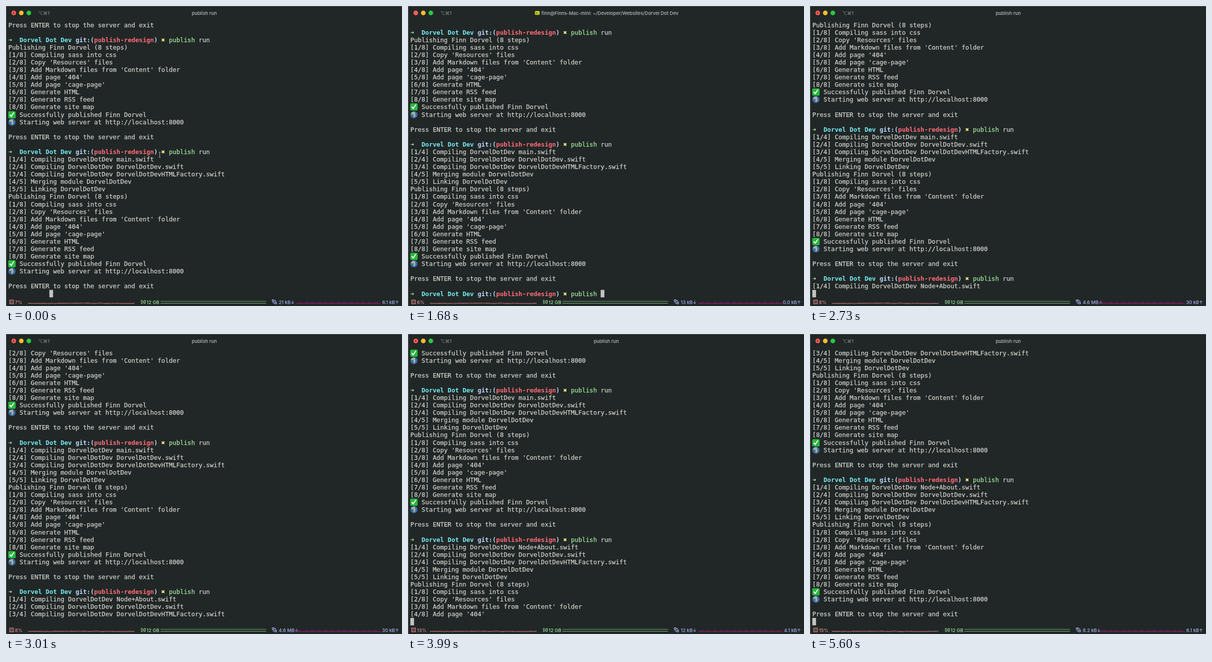
Write an HTML page with a canvas that moves like this. It is 800x606 px and loops after 5670 ms.

```html
<!DOCTYPE html>
<html lang="en">
<head>
<meta charset="utf-8">
<title>Terminal</title>
<style>
  html, body { margin: 0; width: 100%; height: 100%; overflow: hidden; background: #212726; }
  canvas { display: block; width: 800px; height: 606px; }
</style>
</head>
<body>
<canvas id="stage" width="800" height="606"></canvas>
<script>
const ctx = document.getElementById('stage').getContext('2d');
const LOOP = 5670, STEP = 70;
const CELL = 7.54, PITCH = 15.085, LEFT = 4.7, BASE = 42.5, ROWS = 37;
const MONO = '12.6px "DejaVu Sans Mono", monospace';
const UI = '500 9.5px Inter, sans-serif';
const INK = '#d0d1cc', GREEN = '#a3e8a0', PALE = '#b9d6f8', PINK = '#e08d90', BLUE = '#a9b0f0';

// Scrollback: strings, or an object holding the command typed at a prompt
const publishing = [
  'Publishing Finn Dorvel (8 steps)',
  ...['Compiling sass into css', "Copy 'Resources' files", "Add Markdown files from 'Content' folder",
    "Add page '404'", "Add page 'cage-page'", 'Generate HTML', 'Generate RSS feed', 'Generate site map',
  ].map((text, i) => `[${i + 1}/8] ${text}`),
  '\u2713  Successfully published Finn Dorvel',
  '\u25cf  Starting web server at http://localhost:8000',
  '', 'Press ENTER to stop the server and exit',
];
const building = file => [
  ...[file, 'DorvelDotDev.swift', 'DorvelDotDevHTMLFactory.swift']
    .map((name, i) => `[${i + 1}/4] Compiling DorvelDotDev ${name}`),
  '[4/5] Merging module DorvelDotDev', '[5/5] Linking DorvelDotDev',
];
const command = { typed: 'publish run' };
const lines = [
  publishing.at(-1), '', command, ...publishing, '',
  command, ...building('main.swift'), ...publishing, '',
  command, ...building('Node+About.swift'), ...publishing, '',
];

// [start time, finished lines]
const output = [[0, 36], [140, 37], [2170, 38], [2660, 39], [2800, 40], [2940, 41], [3290, 42], [3430, 43]];
// [start time, cpu, download, upload]
const status = [
  [0, '7%', '21 kB', '6.1 kB'], [210, '6%', '13 kB', '0.0 kB'], [2170, '8%', '4.6 MB', '30 kB'],
  [3220, '13%', '12 kB', '4.1 kB'], [4200, '18%', '14 kB', '11 kB'], [5180, '15%', '8.2 kB', '6.1 kB'],
];
const latest = (list, t) => list.findLast(entry => entry[0] <= t);
const within = (t, from, to) => t >= from && t < to;

function finishedLines(t) {
  if (t < 3850) return latest(output, t)[1];
  return Math.min(56, 44 + Math.floor((t - 3850) / STEP) * 2);
}

function box(x, y, w, h, color, radius = 0) {
  ctx.fillStyle = color;
  ctx.beginPath();
  ctx.roundRect(x, y, w, h, radius);
  ctx.fill();
}

function dot(x, y, r, color) {
  box(x - r, y - r, 2 * r, 2 * r, color, r);
}

function path(points, color, width = 1) {
  ctx.strokeStyle = color;
  ctx.lineWidth = width;
  ctx.beginPath();
  points.forEach(([x, y]) => ctx.lineTo(x, y));
  ctx.stroke();
}

function label(text, x, y, color, align = 'left') {
  ctx.font = UI;
  ctx.textAlign = align;
  ctx.fillStyle = color;
  ctx.fillText(text, x, y);
}

// Writes one character per terminal cell, with a hairline for medium weight
function write(text, col, y, color = INK, bold = false) {
  ctx.font = (bold ? 'bold ' : '') + MONO;
  ctx.textAlign = 'left';
  ctx.fillStyle = ctx.strokeStyle = color;
  ctx.lineWidth = 0.25;
  [...text].forEach((c, i) => {
    const x = LEFT + (col + i) * CELL;
    ctx.fillText(c, x, y);
    if (!bold) ctx.strokeText(c, x, y);
  });
  return col + text.length;
}

function checkMark(y) {
  box(4.5, y - 11.5, 15, 14.5, '#27b83c', 2.5);
  path([[7.5, y - 4.5], [10.5, y - 1], [16, y - 9]], '#fff', 2);
}

function globe(y) {
  dot(12, y - 4.3, 7.3, '#3a68a8');
  ctx.fillStyle = '#a5b49a';
  ctx.beginPath();
  ctx.ellipse(10.5, y - 7.5, 4, 2.4, -0.3, 0, 7);
  ctx.ellipse(13, y - 3.2, 2, 4, 0.2, 0, 7);
  ctx.fill();
}

function drawPrompt(y, typed) {
  write('\u279c', 0, y, GREEN, true);
  write('Dorvel Dot Dev', 3, y, '#75eaf2', true);
  let col = write('git:(', 18, y, PALE, true);
  col = write('publish-redesign', col, y, '#ff6b79', true);
  write(')', col, y, PALE, true);
  write('\u2716', 41, y, '#f2f08c', true);
  write(typed.slice(0, 7), 43, y, GREEN);
  write(typed.slice(7), 50, y);
}

function drawLine(line, y) {
  if (line.typed !== undefined) return drawPrompt(y, line.typed);
  if (line[0] === '\u2713') checkMark(y);
  else if (line[0] === '\u25cf') globe(y);
  else return write(line, 0, y);
  write(line.slice(3), 3, y);
}

function drawTerminal(t) {
  const count = finishedLines(t), top = count - ROWS + 1;
  const typed = command.typed.slice(0, Math.max(0, Math.floor((t - 1120) / STEP)));
  const atPrompt = count === 37;
  const rowY = row => Math.round(BASE + row * PITCH);
  for (let row = 0; row < ROWS - 1; row++) drawLine(lines[top + row], rowY(row));
  const y = rowY(ROWS - 1);
  if (atPrompt) drawPrompt(y, typed);
  const col = atPrompt ? 43 + typed.length : count === 36 ? 11 : 0;
  if (!within(t, 2870, 3220)) box(LEFT + col * CELL, y - 12.5, 7.5, 15, '#c3c4c0');
}

function drawTitleBar(t) {
  ['#ff5f57', '#febc2e', '#2bc840'].forEach((color, i) => dot(15.7 + i * 15.2, 14, 4.7, color));
  const idle = within(t, 140, 2450);
  if (!idle) dot(15.7, 14, 1.5, '#7c1410');
  label('\u2325\u23181', 65, 17.5, '#858987');
  const title = within(t, 140, 2170) ? 'finn@Finns-Mac-mini: ~/Developer/Websites/Dorvel Dot Dev' : 'publish run';
  label(title, idle ? 408 : 400.5, 17.5, '#b9bbb9', 'center');
  if (idle) {
    const x = 408 - ctx.measureText(title).width / 2 - 13;
    box(x, 10, 9.5, 8, '#c9cf28', 1.5);
    path([[x + 2, 12], [x + 4, 13.7], [x + 2, 15.4]], '#30340c');
    path([[x + 4.6, 16], [x + 7.4, 16]], '#30340c');
  }
}

function outline(x, y, w, h, color) {
  ctx.strokeStyle = color;
  ctx.lineWidth = 1.2;
  ctx.strokeRect(x, y, w, h);
}

const wobble = n => Math.abs(Math.sin(n * 12.9898) * 43758.5453) % 1;

function drawStatus(t) {
  const [, cpu, down, up] = latest(status, t);
  const tick = status.indexOf(latest(status, t));
  const y = 601.5;

  outline(7.5, 594, 7.5, 7.5, PINK);
  outline(9.7, 596.2, 3, 3, '#8d5a5c');
  label(cpu, 18, y, PINK);
  path(Array.from({ length: 55 }, (_, i) => [44 + i * 4, 601 - wobble(i + tick) * 0.9]), '#c4757a', 1.2);

  path([[275.5, 594.5], [273.5, 594.5], [273.5, 601], [275.5, 601]], GREEN);
  path([[279.5, 594.5], [281.5, 594.5], [281.5, 601], [279.5, 601]], GREEN);
  path([[276.5, 595], [276.5, 601]], GREEN);
  path([[279, 595], [279, 601]], GREEN);
  label('12 GB', 284, y, GREEN);
  path([[312, 596.5], [525.5, 596.5]], '#73a873');
  path([[312, 600.5], [525.5, 600.5]], '#86bb84');

  outline(538, 593.5, 3.5, 3, BLUE);
  outline(543, 598.5, 3.5, 3, BLUE);
  path([[539.5, 597], [539.5, 600], [542.5, 600]], BLUE);
  path([[542, 595], [545, 595], [545, 598]], BLUE);
  label(down + '\u2193', 551, y, BLUE);
  label(up + '\u2191', 794, y, BLUE, 'right');
  for (let i = 0; i < 13; i++) {
    const x = 590 + i * 12.8 + wobble(i + tick) * 3;
    path([[x, 600], [x + 2, 598.5], [x + 4, 598.5], [x + 6, 600]], '#2f2fa8', 1.2);
  }
  path([[586, 600.8], [757, 600.8]], '#a01450', 1.4);
}

function drawPointer() {
  path([[308.5, 295], [310.5, 296], [312.5, 295]], '#b5b7b4');
  path([[310.5, 296], [310.5, 305]], '#b5b7b4');
  path([[308.5, 306], [310.5, 305], [312.5, 306]], '#b5b7b4');
}

function draw(now) {
  const t = Math.floor((now % LOOP) / STEP) * STEP;
  box(0, 0, 800, 606, '#212726');
  path([[0.5, 606], [0.5, 0.5], [800, 0.5]], '#59605e');
  drawTitleBar(t);
  drawTerminal(t);
  drawStatus(t);
  if (t < 1120) drawPointer();
  if (within(t, 140, 1400)) box(794.5, 497, 4.5, 91, '#777b79', 2.2);
  requestAnimationFrame(() => draw(performance.now()));
}
draw(0);
</script>
</body>
</html>
```
